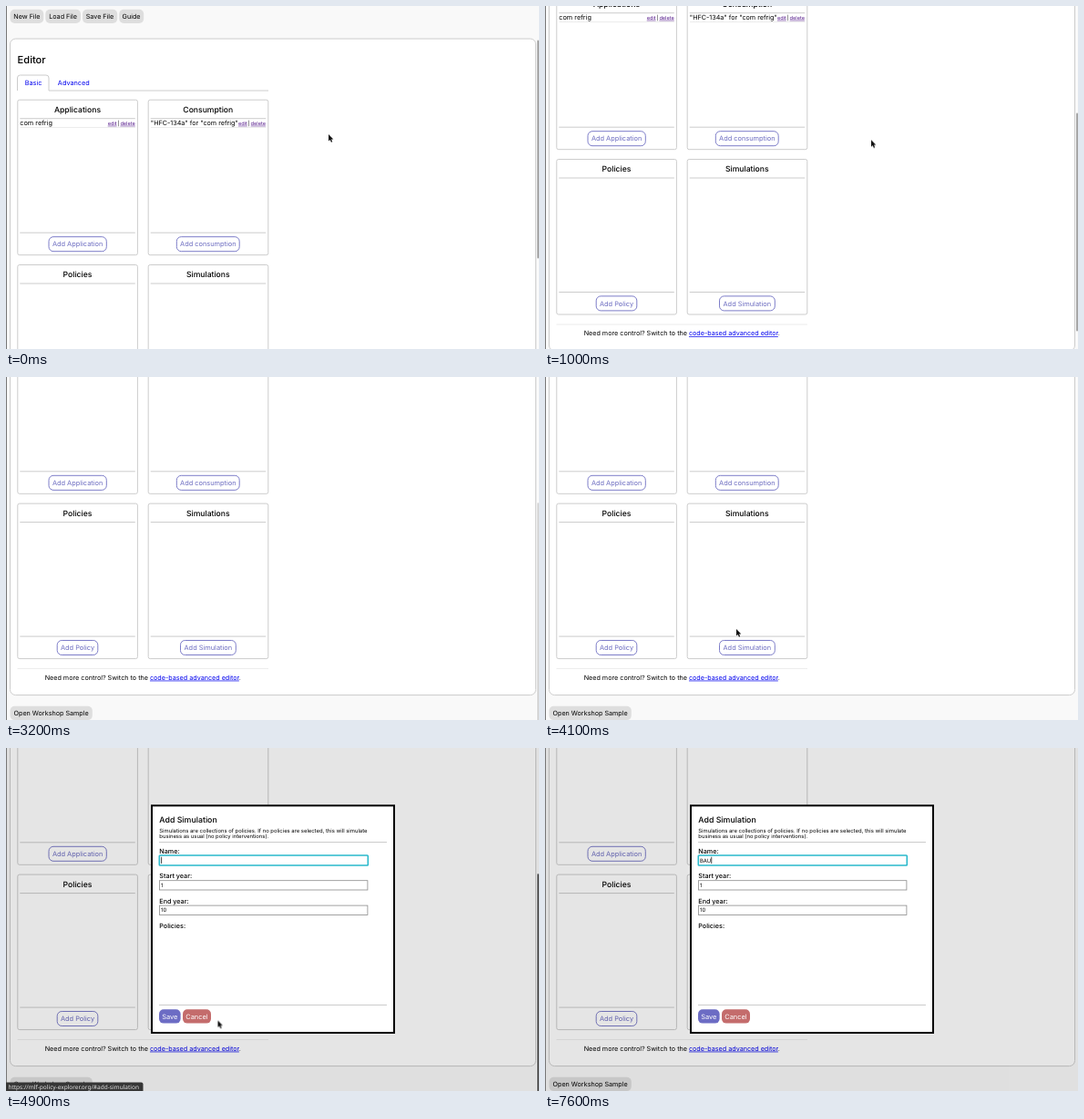
Animation of 585x377 px, one loop 8000 ms. Source, as an HTML page:

```html
<!DOCTYPE html>
<html lang="en">
<head>
<meta charset="utf-8">
<title>Policy editor</title>
<style>
html, body { margin: 0; width: 100%; height: 100%; overflow: hidden; background: #f9f9f9; }
svg { display: block; width: 585px; height: 377px; font: 7.2px Inter, "Open Sans", sans-serif; text-rendering: geometricPrecision; }
.mid { text-anchor: middle; }
.h2 { font-size: 8.6px; font-weight: 500; }
.label { font-size: 7.2px; font-weight: 500; }
.value { font-size: 5.9px; }
.blue { fill: #0000ee; }
.link { fill: #0000ee; text-decoration: underline; }
.small { font-size: 5.6px; }
.small .link { fill: #551a8b; }
.gray rect { fill: #dedede; }
.line { stroke: #ccc; fill: none; }
.faint { stroke: #ececec; fill: none; }
.add rect { fill: #fff; stroke: #7c7cc8; }
.add text, .act { font-size: 7.4px; text-anchor: middle; }
.add text { fill: #6c6cc0; }
.act { fill: #fff; }
.field { fill: #fff; stroke: #8a8a8a; stroke-width: .8; }

/* one 100 ms step is 1.25% of the loop */
.page, .bar, .arrow, .beam, .caret, .status, .dialog, .hot rect, .hot text {
  animation: 8s step-end -10ms infinite;
}
.page { animation-name: scroll; }
.bar { animation-name: thumb; }
.arrow { animation-name: point; }
.beam { animation-name: beam; }
.caret { animation-name: type; }
.status { animation-name: status; }
.dialog { animation-name: dialog; }
.hot rect { animation-name: hot-box; }
.hot text { animation-name: hot-text; }

@keyframes scroll {
  0% { transform: translateY(0); }
  10% { transform: translateY(-29.5px); }
  11.25% { transform: translateY(-76px); }
  12.5% { transform: translateY(-116px); }
  13.75% { transform: translateY(-138px); }
  15%, 100% { transform: translateY(-145.4px); }
}
@keyframes thumb {
  0% { transform: translateY(0); opacity: .33; }
  10% { transform: translateY(20px); opacity: .33; }
  11.25% { transform: translateY(52.5px); opacity: .33; }
  12.5% { transform: translateY(80px); opacity: .33; }
  13.75% { transform: translateY(95px); opacity: .33; }
  15% { transform: translateY(100.5px); opacity: .33; }
  40% { transform: translateY(100.5px); opacity: .14; }
  41.25% { transform: translateY(100.5px); opacity: 0; }
  57.5% { transform: translateY(100.5px); opacity: .6; }
  87.5% { transform: translateY(100.5px); opacity: .25; }
  88.75%, 100% { transform: translateY(100.5px); opacity: 0; }
}
@keyframes point {
  0% { transform: translate(354px, 141px); }
  2.5% { transform: translate(356px, 144px); }
  3.75% { transform: translate(357.6px, 147px); }
  6.25% { transform: translate(358px, 147.2px); }
  21.25% { transform: translate(330px, 149px); }
  22.5% { transform: translate(262px, 156px); }
  23.75% { transform: translate(180px, 162px); }
  25% { transform: translate(101px, 166px); }
  26.25% { transform: translate(-20px, 170px); }
  41.25% { transform: translate(40px, 200px); animation-timing-function: steps(4); }
  46.25% { transform: translate(168px, 250px); animation-timing-function: steps(3); }
  50% { transform: translate(205px, 272px); }
  51.25% { transform: translate(210px, 277px); animation-timing-function: steps(4); }
  56.25% { transform: translate(228px, 295px); animation-timing-function: steps(3); }
  60% { transform: translate(232.5px, 299.5px); }
  62.5% { transform: translate(232px, 294px); }
  63.75% { transform: translate(231px, 276px); }
  65% { transform: translate(229px, 246px); animation-timing-function: steps(3); }
  68.75% { transform: translate(219px, 150px); }
  70% { transform: translate(216px, 132px); }
  71.25%, 100% { transform: translate(-20px, 0); }
}
@keyframes beam {
  0% { transform: translate(-20px, 0); }
  71.25% { transform: translate(215px, 122px); }
  72.5% { transform: translate(215px, 120.3px); }
  73.75% { transform: translate(215px, 120px); }
  90%, 100% { transform: translate(-20px, 0); }
}
@keyframes type {
  0% { transform: translateX(0); }
  90% { transform: translateX(3.8px); }
  92.5% { transform: translateX(7.8px); }
  95%, 100% { transform: translateX(12.1px); }
}
@keyframes status {
  0% { visibility: hidden; }
  55% { visibility: visible; }
  65%, 100% { visibility: hidden; }
}
@keyframes dialog {
  0% { visibility: hidden; }
  61.25%, 100% { visibility: visible; }
}
@keyframes hot-box {
  0% { fill: #fff; stroke: #7c7cc8; }
  53.75%, 100% { fill: #4c4cb8; stroke: #4c4cb8; }
}
@keyframes hot-text {
  0% { fill: #6c6cc0; }
  53.75%, 100% { fill: #f0f0ff; }
}
</style>
</head>
<body>
<svg viewBox="0 0 585 377">
  <defs>
    <g id="card">
      <rect class="line" x=".5" y=".5" width="131.6" height="170.5" rx="2"/>
      <path class="line" d="M3 21h126.5M3 146.5h126.5"/>
    </g>
    <g id="links" class="small">
      <text class="link" x="0" y="0">edit</text>
      <text x="10.7" y="0">|</text>
      <text class="link" x="13.7" y="0">delete</text>
    </g>
  </defs>

  <rect width="585" height="377" fill="#f9f9f9"/>

  <g class="page">
    <g class="gray mid">
      <rect x="4.5" y="3.7" width="36.8" height="15.3" rx="5"/>
      <rect x="43.3" y="3.7" width="38.7" height="15.3" rx="5"/>
      <rect x="84" y="3.7" width="38.2" height="15.3" rx="5"/>
      <rect x="124.2" y="3.7" width="27" height="15.3" rx="5"/>
      <text x="22.9" y="14">New File</text>
      <text x="62.6" y="14">Load File</text>
      <text x="103" y="14">Save File</text>
      <text x="137.6" y="14">Guide</text>
    </g>

    <rect x="4.5" y="36" width="577" height="459" rx="6" fill="#fff" stroke="#ccc"/>
    <text x="12.6" y="63.2" font-size="11.1" font-weight="500">Editor</text>
    <path class="line" d="M12.5 93V79q0-3 3-3h28.500q3 0 3 3v14H288"/>
    <g class="blue mid" font-size="7.3">
      <text x="30" y="87">Basic</text>
      <text x="74.3" y="87">Advanced</text>
    </g>

    <use href="#card" x="12.3" y="102.700"/>
    <use href="#card" x="155.700" y="102.700"/>
    <use href="#card" x="12.3" y="284"/>
    <use href="#card" x="155.700" y="284"/>
    <g class="h2 mid">
      <text x="78.500" y="117.200">Applications</text>
      <text x="221.800" y="117.200">Consumption</text>
      <text x="78.500" y="298.300">Policies</text>
      <text x="221.800" y="298.300">Simulations</text>
    </g>

    <path class="faint" d="M15.500 133.500H142M159 133.500H285.500"/>
    <text x="15.300" y="131.300" font-size="7.3">com refrig</text>
    <text x="158.800" y="131.300">"HFC-134a" for "com refrig"</text>
    <use href="#links" x="111.700" y="130.700"/>
    <use href="#links" x="254.900" y="130.700"/>

    <g class="add">
      <rect x="47" y="253.700" width="63.300" height="16" rx="5"/>
      <rect x="187.300" y="253.700" width="68.900" height="16" rx="5"/>
      <rect x="56.200" y="434.900" width="44.600" height="16" rx="5"/>
      <text x="78.600" y="264.400">Add Application</text>
      <text x="221.800" y="264.400">Add consumption</text>
      <text x="78.500" y="445.600">Add Policy</text>
      <g class="hot">
        <rect x="191.500" y="434.900" width="60.800" height="16" rx="5"/>
        <text x="221.800" y="445.600">Add Simulation</text>
      </g>
    </g>

    <path class="faint" d="M12.500 466H288"/>
    <text class="mid" x="150.300" y="478">Need more control? Switch to the <tspan class="link">code-based advanced editor</tspan>.</text>

    <g class="gray mid">
      <rect x="4.500" y="507.200" width="90.300" height="15.300" rx="5"/>
      <text x="49.600" y="517.600">Open Workshop Sample</text>
    </g>
  </g>

  <rect class="bar" x="583" y="37.500" width="2" height="240" rx="1"/>

  <g class="dialog">
    <rect width="585" height="377" fill-opacity=".1"/>
    <rect x="160" y="63.300" width="266" height="249.700" fill="#fff" stroke="#000" stroke-width="2"/>
    <text x="168.300" y="82.200" font-size="8.8" font-weight="500">Add Simulation</text>
    <g class="value">
      <text x="168.300" y="92.500">Simulations are collections of policies. If no policies are selected, this will simulate</text>
      <text x="168.300" y="99.400">business as usual (no policy interventions).</text>
    </g>
    <path class="line" d="M168 103.500H418M168 282.500H418"/>
    <g class="label">
      <text x="168.300" y="116">Name:</text>
      <text x="168.300" y="143.400">Start year:</text>
      <text x="168.300" y="170.800">End year:</text>
      <text x="168.300" y="198.200">Policies:</text>
    </g>
    <rect x="168.300" y="118" width="229" height="11" rx=".8" fill="#fff" stroke="#2ab9cc" stroke-width="1.6"/>
    <rect class="field" x="168.400" y="145.700" width="228.500" height="10.300"/>
    <rect class="field" x="168.400" y="173.100" width="228.500" height="10.300"/>
    <g class="value">
      <text x="170" y="125.500">BAU</text>
      <text x="170" y="152.900">1</text>
      <text x="170" y="180.300">10</text>
    </g>
    <g class="caret">
      <rect x="170.300" y="119.500" width="16" height="8" fill="#fff"/>
      <rect x="170.400" y="119.700" width=".7" height="7.400"/>
    </g>
    <rect x="168" y="287.300" width="23.600" height="15.300" rx="5" fill="#6c6cc4"/>
    <rect x="194" y="287.300" width="31" height="15.300" rx="5" fill="#c46c6c"/>
    <text class="act" x="179.800" y="297.700">Save</text>
    <text class="act" x="209.400" y="297.700">Cancel</text>
  </g>

  <rect width="1" height="377" fill="#777"/>

  <g class="status">
    <path d="M0 367.500H148.500q2 0 2 2V377H0Z" fill="#363636"/>
    <text x="2.400" y="374.800" fill="#e4e4e4" style="font: 6.5px 'Noto Sans', sans-serif">https://mlf-policy-explorer.org/#add-simulation</text>
  </g>

  <path class="arrow" d="M0 0V7.600L1.700 6.100 2.900 8.800 4.200 8.200 3 5.600H5.300Z" fill="#111" stroke="#fff" stroke-width=".8" paint-order="stroke"/>
  <path class="beam" d="M-1.500-4.500Q0-4.500 0-3.500 0-4.500 1.500-4.500M0-3.500V3.500M-1.500 4.500Q0 4.500 0 3.500 0 4.500 1.500 4.500" fill="none" stroke="#222" stroke-width=".8"/>
</svg>
</body>
</html>
```
